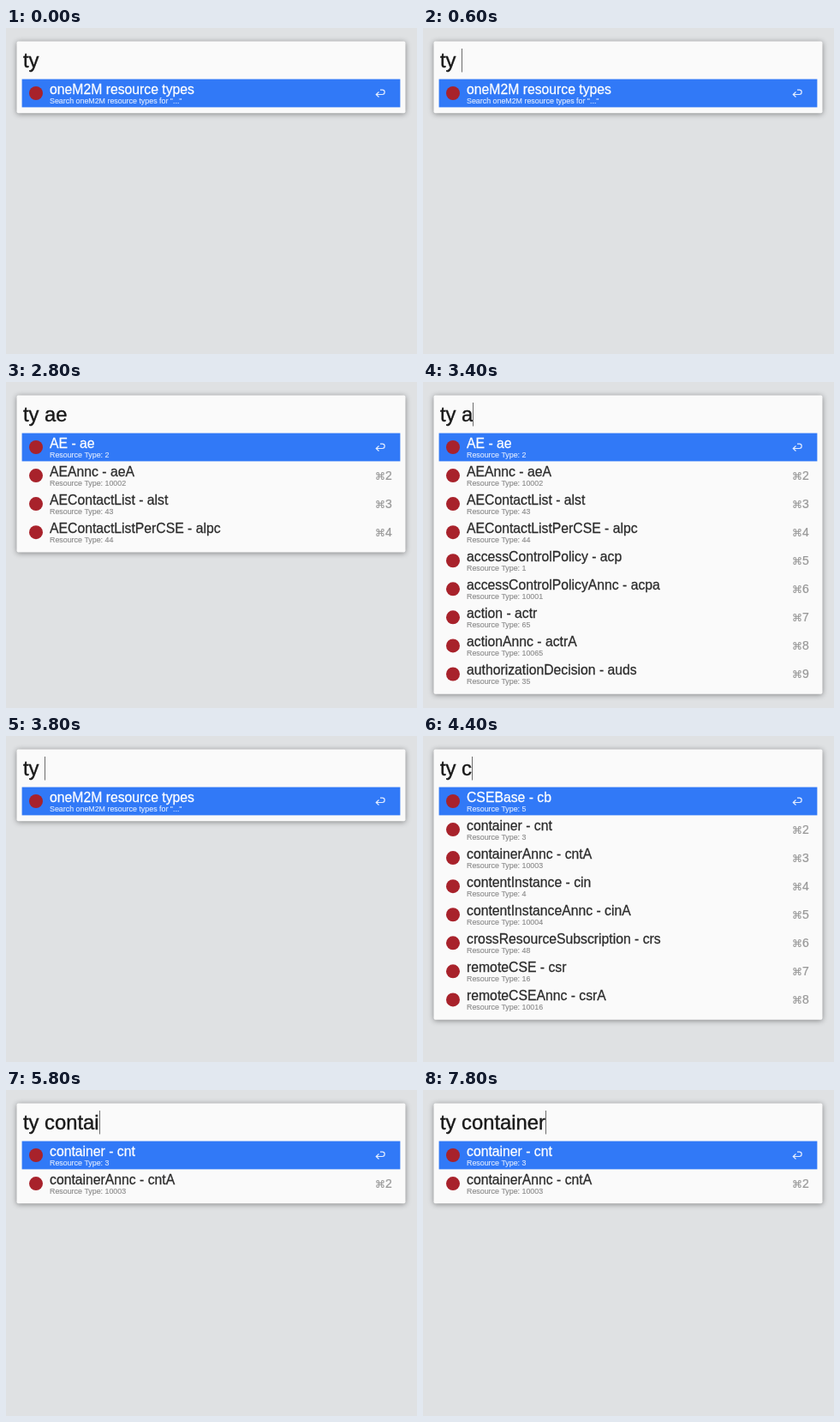
Write an HTML page with a canvas that moves like this. It is 480 by 380 pixels and loops after 8 s.

```html
<!DOCTYPE html>
<html lang="en">
<head>
<meta charset="utf-8">
<title>Resource type search</title>
<style>
html, body { margin: 0; width: 100%; height: 100%; overflow: hidden; background: #dfe1e3; }
canvas { display: block; }
</style>
</head>
<body>
<canvas id="stage" width="480" height="380"></canvas>
<script>
const ctx = document.getElementById('stage').getContext('2d');
const LOOP = 8000, STEP = 200, ROW = 33.06;
const SANS = '"Liberation Sans", Arial, sans-serif';

const AE = [['AE - ae', 2], ['AEAnnc - aeA', 10002], ['AEContactList - alst', 43], ['AEContactListPerCSE - alpc', 44]];
const A = [...AE, ['accessControlPolicy - acp', 1], ['accessControlPolicyAnnc - acpa', 10001],
  ['action - actr', 65], ['actionAnnc - actrA', 10065], ['authorizationDecision - auds', 35]];
const CONTAINER = [['container - cnt', 3], ['containerAnnc - cntA', 10003]];
const CONT = [...CONTAINER, ['contentInstance - cin', 4], ['contentInstanceAnnc - cinA', 10004]];
const C = [['CSEBase - cb', 5], ...CONT, ['crossResourceSubscription - crs', 48],
  ['remoteCSE - csr', 16], ['remoteCSEAnnc - csrA', 10016]];
const HINT = [['oneM2M resource types', 'Search oneM2M resource types for "..."']];

// [time of key press, query, results]
const keys = [
  [-600, 'ty', HINT], [600, 'ty ', HINT], [800, 'ty a', A], [1000, 'ty ae', AE],
  [3200, 'ty a', A], [3800, 'ty ', HINT], [4000, 'ty c', C],
  [4800, 'ty co', CONT], [5000, 'ty con', CONT], [5200, 'ty cont', CONT],
  [5400, 'ty conta', CONTAINER], [5600, 'ty contai', CONTAINER], [6000, 'ty contain', CONTAINER],
  [6200, 'ty containe', CONTAINER], [6600, 'ty container', CONTAINER]
];

// A hairline stroke gives the text a slightly fuller weight.
function text(str, x, y, size, color, family = SANS) {
  ctx.font = `${size}px ${family}`;
  ctx.fillStyle = ctx.strokeStyle = color;
  ctx.lineWidth = size / 60;
  ctx.fillText(str, x, y);
  ctx.strokeText(str, x, y);
}

function drawCard(height) {
  ctx.save();
  ctx.shadowColor = 'rgba(0,0,0,.42)';
  ctx.shadowBlur = 6;
  ctx.shadowOffsetY = 1;
  ctx.fillStyle = '#fafafa';
  ctx.beginPath();
  ctx.roundRect(12.5, 15.4, 454, height, 2);
  ctx.fill();
  ctx.restore();
}

function drawReturnArrow(y) {
  ctx.strokeStyle = '#e4edff';
  ctx.lineWidth = 1.2;
  ctx.stroke(new Path2D(`M435.5 ${y - 1.5}l-3.2 3l3.2 3M432.3 ${y + 1.5}h7.2a2.7 2.7 0 0 0 0-5.4h-2.5`));
}

function drawRow([title, detail], i) {
  const y = 60 + i * ROW, selected = i === 0;
  if (selected) {
    ctx.fillStyle = '#3179f7';
    ctx.fillRect(18.6, y - 0.4, 441.8, 32.8);
  }
  ctx.fillStyle = '#a8222b';
  ctx.beginPath();
  ctx.arc(35, y + 16, 8, 0, Math.PI * 2);
  ctx.fill();
  const subtitle = typeof detail === 'number' ? `Resource Type: ${detail}` : detail;
  text(title, 51, y + 16.5, 15.75, selected ? '#fff' : '#2b2b2b');
  text(subtitle, 51, y + 27.6, 8.87, selected ? '#dce8ff' : '#8c8c8c');
  if (selected) {
    drawReturnArrow(y + 16);
  } else {
    text('⌘', 431, y + 21, 12, '#999', '"DejaVu Sans", sans-serif');
    text(i + 1, 443, y + 21, 14, '#999');
  }
}

function draw(time) {
  const [pressed, query, results] = keys.findLast(key => key[0] <= time);
  ctx.fillStyle = '#dfe1e3';
  ctx.fillRect(0, 0, 480, 380);
  drawCard(50.8 + results.length * ROW);
  text(query, 20, 46, 23.8, '#1a1a1a');
  const cursorOn = (time - pressed) % 1200 < 600;
  if (cursorOn) {
    const x = Math.round(20 + ctx.measureText(query).width);
    ctx.fillStyle = '#6c6c6c';
    ctx.fillRect(x, 24, 1, 27.5);
  }
  results.forEach(drawRow);
}

function frame(now) {
  draw(Math.floor(now % LOOP / STEP) * STEP);
  requestAnimationFrame(frame);
}
requestAnimationFrame(frame);
</script>
</body>
</html>
```
